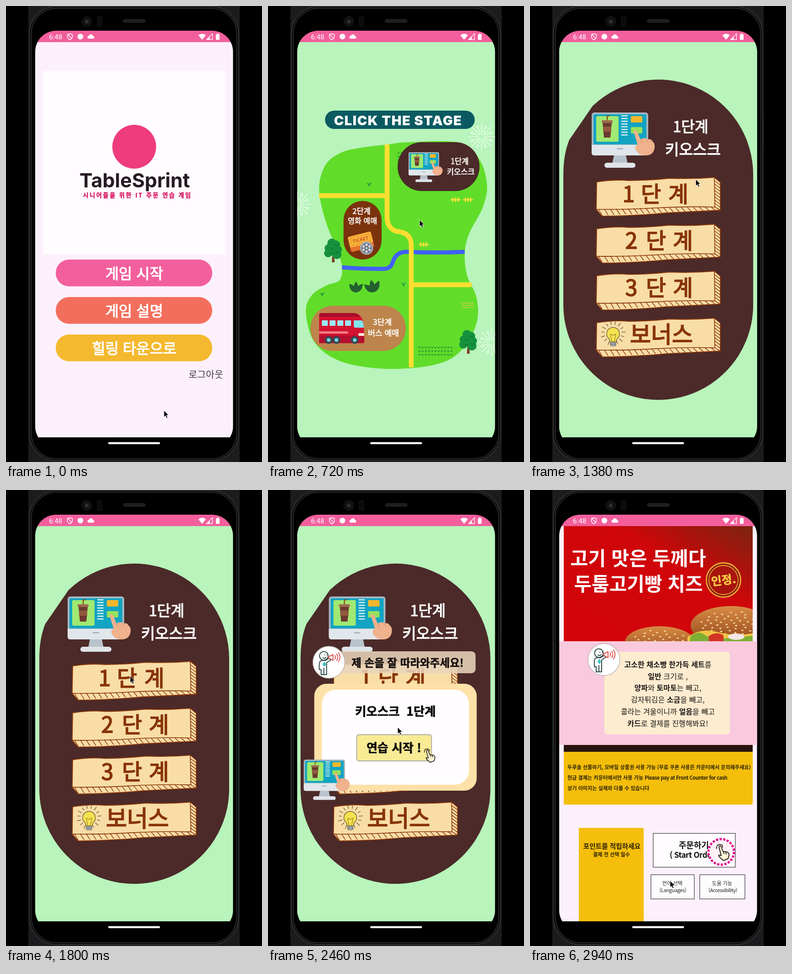
An HTML page for the animation above (3000 ms loop, 561 px wide and 998 px high).

```html
<!DOCTYPE html>
<html lang="ko">
<head>
<meta charset="utf-8">
<style>
html, body { margin: 0; width: 100%; height: 100%; overflow: hidden; background: #000; }
svg { display: block; width: 100vw; height: 100vh; }
text { font-family: "Noto Sans CJK KR", "Noto Sans CJK", "Noto Sans CJK JP", sans-serif; white-space: pre; }
</style>
</head>
<body>
<svg id="stage" viewBox="0 0 561 998" xmlns="http://www.w3.org/2000/svg"></svg>
<script>
const PINK = '#f25f9c', MINT = '#b8f4bb', PALE = '#fdf0fd', COCOA = '#4b2a29', BROWN = '#883407';

// --- drawing helpers -------------------------------------------------------
const rect = (x, y, x2, y2, fill, r = 0, more = '') =>
  `<rect x="${x}" y="${y}" width="${x2 - x}" height="${y2 - y}" rx="${r}" fill="${fill}" ${more}/>`;
const circle = (x, y, r, fill, more = '') => `<circle cx="${x}" cy="${y}" r="${r}" fill="${fill}" ${more}/>`;
const path = (d, fill, more = '') => `<path d="${d}" fill="${fill}" ${more}/>`;
const line = (d, stroke, width, more = '') =>
  path(d, 'none', `stroke="${stroke}" stroke-width="${width}" stroke-linecap="round" stroke-linejoin="round" ${more}`);
const group = (move, body, more = '') => `<g transform="${move}" ${more}>${body}</g>`;
const use = (id, move) => `<use href="#${id}" transform="${move}"/>`;
const repeat = (n, draw) => Array.from({ length: n }, (_, i) => draw(i)).join('');
// y is the optical middle of the line; a thin stroke gives the weights between regular, bold and black
const MEDIUM = 500, HEAVY = 800;
const label = (x, y, size, str, fill = '#fff', weight = MEDIUM, more = 'text-anchor="middle"') => {
  const swell = { [MEDIUM]: .038, [HEAVY]: .025 }[weight] || 0;
  const face = weight === MEDIUM ? 400 : weight === HEAVY ? 700 : weight;
  return `<text x="${x}" y="${y + size * 0.375}" font-size="${size}" fill="${fill}" stroke="${swell ? fill : 'none'}"
    stroke-width="${size * swell}" font-weight="${face}" ${more}>${str}</text>`;
};

function smoothLoop(points) {
  const n = points.length, at = i => points[(i + n) % n];
  return `M${at(0)}` + repeat(n, i => {
    const [a, b, c, d] = [at(i - 1), at(i), at(i + 1), at(i + 2)];
    const mix = (p, q, r, s) => [p[0] + (r[0] - q[0]) * s, p[1] + (r[1] - q[1]) * s];
    return `C${mix(b, a, c, 1 / 6)} ${mix(c, b, d, -1 / 6)} ${c}`;
  }) + 'Z';
}

// --- shared pictures -------------------------------------------------------
const kiosk =
  path('M184 326h26l4 20h-34z', '#b9c3cc') + rect(163, 343, 231, 354, '#dfe4e9', 6) +
  rect(135, 233, 259, 327, '#a9b6c1', 6) + path('M135 304h124v17q0 6-6 6H141q-6 0-6-6z', '#e0e6eb') +
  rect(139, 237, 255, 303, '#12a4c2', 2) + rect(145, 241, 194, 297, '#a0e972', 3) +
  line('M169 250v-9l5-1', BROWN, 2) + rect(157, 250, 181, 256, '#a06a4c', 2) +
  path('M159 256h20l-3 32h-14z', '#6b3a30') + rect(160, 264, 178, 275, '#93593e') +
  repeat(8, i => rect(200, 239 + i * 6, 214, 241.5 + i * 6, '#d9f3f7', 1)) +
  rect(221, 241, 246, 255, '#f4b62c', 2) + rect(221, 265, 246, 279, '#96e05c', 2) +
  rect(190, 311, 204, 314, '#aab4bd', 1.5) +
  path('M227 275q3-6 8 0l7 17q10-6 15 0q9-2 11 4q6 4 5 14q-2 16-18 17q-16 1-23-12q-4-8 4-11z', '#f0b18d') +
  line('M243 293l2 6M257 293l2 5', '#d98f6c', 1.2);

const guide =
  circle(0, 0, 35, '#fff', 'stroke="#bbb3ae" stroke-width="1.4"') +
  `<g fill="none" stroke="#2f4a48" stroke-width="2" stroke-linecap="round" stroke-linejoin="round">
    <circle cx="-11" cy="-14" r="9.5"/><path d="M-13-10q4 3 7-1M-9-16h.2M-4-16h.2"/>
    <path d="M-15-4q-6 1-6 8v12h4v11h6v-14v14h6V1L4-5l-3-4l-8 5z"/></g>` +
  path('M-10-2l4 7l-4 5l-4-5z', '#3fc0c4') +
  `<g fill="none" stroke="#dd5552" stroke-width="2" stroke-linecap="round">
    <path d="M-1-12l10-5v13l-10-5zM13-15q3 4 0 8M17-18q5 7 0 14M21-21q7 10 0 20"/></g>`;

const hand = path('M-4-11q3-4 5 0l4 10l8 1q6 2 5 8l-2 7l-10 4l-8-7q-5-5-1-5l4 1z', '#fff6d8',
  'stroke="#2d2522" stroke-width="2" stroke-linejoin="round"') +
  line('M-9-7q-1-9 7-9q7 0 6 6M6 0l1 4M11 1l1 4', '#2d2522', 1.8);

const plank =
  path('M146 385q40-6 70-3q40 0 90-5q50 2 98-2l13 11v61q-60 3-120 6q-60 6-139 7l-13-15z', '#f8dda7',
    `stroke="${BROWN}" stroke-width="1.8" stroke-linejoin="round"`) +
  line('M145 445q60 1 130-3t130-2l-1-65M405 440l12 7', BROWN, 1.6) +
  repeat(20, i => line(`M${150 + i * 13} ${445 - i * .25}l8 ${13 - i * .35}`, BROWN, 1.4)) +
  repeat(8, i => line(`M405 ${383 + i * 7}l12 9`, BROWN, 1.4));

const burst = repeat(16, i => group(`rotate(${i * 22.5})`, i % 2
  ? line('M0-9V-20', '#fff', 1.2) + circle(0, -23, 2.4, 'none', 'stroke="#fff"')
  : line('M0-5V-30', '#fff', 1.2)));

const tree = path('M-2 6h4l1 20h-6z', '#7a3d20') + line('M0 14l7-6', '#7a3d20', 2) +
  [[-3, -16, 10], [6, -13, 9], [-10, -5, 9], [10, -2, 9], [-11, 6, 9], [8, 9, 10], [0, 0, 11]]
    .map(([x, y, r]) => circle(x, y, r, '#15913d')).join('') +
  line('M-8-6q4 3 7 0M3-12q4 3 7 0M-9 6q5 3 8 0M5 4q4 3 8 0', '#0b6c2b', 1.3);

const leaf = line('M0 4q-1-5-4-6M0 4q0-5 4-7M0 3v-3', '#14923a', 1.8);
const fence = line('M0 0H20M4-4V4M10-4V4M16-4V4', '#fbe13c', 2.6);
const grass = repeat(33, i => line(`M${(i % 11) * 7} ${Math.floor(i / 11) * 8}l2 3l2-3`, '#188a32', 1.3));
const bush = [-38, 0, 38].map(a => group(`rotate(${a} 0 12)`, path('M0 12q-11-10 0-24q10 14 0 24', '#235f2f'))).join('');

// --- screens ---------------------------------------------------------------
const backdrop = fill => rect(-10, 79, 570, 944, fill);

const home = backdrop(PALE) + rect(81, 142, 481, 543, '#fffcff') + circle(281, 308, 48, '#ee3c7c') +
  label(282, 381, 43, 'TableSprint', '#261b22', 700, 'text-anchor="middle" style="font-family:Inter,sans-serif"') +
  label(288, 414, 13.2, '시니어들을 위한 IT 주문 연습 게임', '#d8125f', HEAVY, 'text-anchor="middle" letter-spacing="2.5"') +
  [['게임 시작', PINK], ['게임 설명', '#f36f5d'], ['힐링 타운으로', '#f4b92f']].map(([name, fill], i) =>
    rect(109, 555 + i * 82, 452, 613.5 + i * 82, fill, 29) + label(281, 585 + i * 82, 32, name)).join('') +
  label(438, 806, 20.6, '로그아웃', '#403a42', 400);

const island = smoothLoop([[262, 303], [310, 298], [420, 299], [463, 335], [480, 392], [470, 442], [440, 500],
  [431, 545], [437, 592], [457, 638], [458, 690], [433, 742], [395, 775], [330, 791], [240, 793], [155, 776],
  [102, 736], [83, 672], [95, 634], [127, 612], [157, 600], [162, 570], [150, 530], [126, 470], [112, 400],
  [126, 348], [160, 321], [205, 310]]);

const ticket = group('translate(203 513) rotate(-14)',
  rect(-26, -4, 26, 20, '#e8742c', 3) + rect(-26, -14, 26, 10, '#f9b23b', 3) +
  rect(-21, -10, 21, 6, 'none', 1, 'stroke="#d9721f" stroke-dasharray="3 2"') +
  label(0, -2, 10, 'TICKET', '#c4501c', 700)) +
  circle(216, 530, 14.5, '#a7adb8') + circle(216, 530, 11.5, '#737b88') +
  repeat(6, i => group(`translate(216 530) rotate(${i * 60})`, circle(0, -7.5, 2.6, '#d4d9e0'))) + circle(216, 530, 2, '#d4d9e0');

const bus = path('M112 677q0-5 5-5h70q20 0 23 28l1 32q0 6-5 6h-94z', '#d3122f') +
  path('M112 677q0-5 5-5h70q9 0 14 8h-89z', '#a80d2b') + rect(112, 721, 211, 738, '#b50f2d', 3) +
  repeat(4, i => rect(118 + i * 17, 688, 131 + i * 17, 700, '#9de8f4', 1)) +
  path('M188 688h18q4 6 4 16h-18q-4 0-4-4z', '#82e4ee') + rect(112, 712, 176, 717, '#f27d86', 2) +
  rect(198, 716, 211, 722, '#fbe9dc', 2) +
  [133, 150, 190].map(x => circle(x, 731, 8.5, '#344653') + circle(x, 731, 4, '#79d6de')).join('');

const map = backdrop(MINT) + path(island, '#61dd29') +
  line('M162 572Q220 576 256 575Q269 575 274 559Q280 540 300 538Q370 541 431 538', '#4160f5', 9, 'style="stroke-linecap:butt"') +
  line('M112 415H258M261 303V462Q261 486 281 493Q314 496 314 523V791M314 610H446', '#fdde30', 10.5, 'style="stroke-linecap:butt"') +
  use('burst', 'translate(468 286)') + use('burst', 'translate(65 434)') + use('burst', 'translate(490 736)') +
  group('translate(284 320)', grass) + group('translate(330 746)', grass) +
  [[222, 390], [297, 609], [119, 631]].map(p => group(`translate(${p})`, leaf)).join('') +
  [[401, 424], [428, 424], [331, 522]].map(p => group(`translate(${p})`, fence)).join('') +
  repeat(15, i => circle(426 + (i % 5) * 5.5 + (Math.floor(i / 5) % 2) * 2, 650 + Math.floor(i / 5) * 5, 1.6, '#e5c94b')) +
  group('translate(193 615)', bush) + group('translate(229 613) rotate(-14) scale(1.15)', bush) +
  use('tree', 'translate(143 535)') + use('tree', 'translate(439 735)') +
  rect(125, 229, 453, 269, '#0b5a62', 20) +
  label(285, 250, 29, 'CLICK THE STAGE', '#fff', 900, 'text-anchor="middle" letter-spacing="1.5" style="font-family:Inter,sans-serif"') +
  rect(284, 298, 463.5, 405, COCOA, 53) + use('kiosk', 'translate(235.1 194.2) scale(.54)') +
  label(420, 340, 16.6, '1단계') + label(422.5, 363, 16.6, '키오스크') +
  rect(165.5, 426.5, 249, 555, '#7b330d', 42) + label(205, 449, 16.5, '2단계') + label(207, 470, 16.2, '영화 예매') + ticket +
  rect(93, 656, 302, 755, '#bd844b', 49) + bus + label(250.5, 692, 17.2, '3단계') + label(253, 716, 17.2, '버스 예매');

const bulb = repeat(14, i => group(`translate(182 716) rotate(${i * 24 - 156})`, line(`M0-19V${i % 2 ? -25 : -27}`, '#5a4a30', 1.2))) +
  path('M175 735q0-6-4-9a14 14 0 1 1 22 0q-4 3-4 9z', '#f6e14f', 'stroke="#56502c" stroke-width="1.2"') +
  line('M179 734l-3-16l6 3l6-3l-3 16', '#8f7a25', 1.1) + rect(176, 736, 188, 744, '#a9b0b4', 2, 'stroke="#555"') + line('M176 740h12', '#555', 1);

const plankText = (y, parts, size) => parts.map(([x, s]) => label(x, y, size, s, BROWN)).join('');

const levels = backdrop(MINT) +
  path('M86 293L137 219A208 208 0 0 1 489 369V654A208 208 0 0 1 73 654V369Q73 325 86 293Z', COCOA) +
  use('kiosk', '') + label(352, 264, 32.5, '1단계') + label(357, 314, 33.2, '키오스크') +
  repeat(4, i => use('plank', `translate(0 ${i * 102.7})`)) +
  plankText(411, [[216, '1'], [265, '단'], [325, '계']], 48) +
  plankText(513, [[222, '2'], [276, '단'], [335, '계']], 48) +
  plankText(616, [[222, '3'], [276, '단'], [335, '계']], 48) +
  plankText(718, [[288, '보너스']], 50) + bulb;

const dialog = rect(140, 353, 456.5, 401, '#ead5ba', 9, 'opacity=".87"') + use('guide', 'translate(135 377)') +
  label(307.5, 378, 23.6, '제 손을 잘 따라와주세요!', '#17110f', HEAVY) +
  rect(103, 424, 459, 658, '#fde1a8', 27) + rect(119.5, 437, 442, 645, '#fffdff', 31) +
  label(281, 484, 26.5, '키오스크  1단계', '#0c0a0b', HEAVY) +
  rect(196, 535.5, 360, 593, '#f9eb94', 5, 'stroke="#a9a9a5" stroke-width="1.8"') +
  label(277.5, 564, 26, '연습 시작 !', '#0c0a0b', HEAVY) +
  use('hand', 'translate(352 580) scale(.85)') + use('kiosk', 'translate(-18.6 419.9) scale(.73)');

const bun = (x, y, rx, ry, n) => `<ellipse cx="${x}" cy="${y}" rx="${rx}" ry="${ry}" fill="url(#crust)"/>` +
  repeat(n, i => {
    const a = i * 2.4, d = Math.sqrt((i + .5) / n) * .8;
    return `<ellipse cx="${x + Math.cos(a) * rx * d}" cy="${y - 6 + Math.sin(a) * ry * d * .75}" rx="2.6" ry="1.6" fill="#f4d29a"/>`;
  });
const b = s => `<tspan font-weight="700">${s}</tspan>`;
const note = [b('고소한 채소빵 한가득 세트') + '를', b('일반') + ' 크기로 ,', b('양파') + '와 ' + b('토마토') + '는 빼고,',
  '감자튀김은 ' + b('소금') + '을 빼고,', '콜라는 겨울이니까 ' + b('얼음') + '을 빼고', b('카드') + '로 결제를 진행해봐요!'];
const notice = ['두루솔 선물하기, 모바일 상품권 사용 가능 (무료 쿠폰 사용은 카운터에서 문의해주세요)',
  '현금 결제는 카운터에서만 사용 가능 <tspan letter-spacing="-.55">Please pay at Front Counter for cash</tspan>',
  '상기 이미지는 실제와 다룰 수 있습니다'];
const outline = 'stroke="#39343a" stroke-width="1.2"';

const order = backdrop(PALE) + rect(74, 79, 488, 331, 'url(#poster)') +
  `<g clip-path="url(#posterClip)">${bun(284, 333, 76, 35, 30)}${bun(440, 297, 88, 43, 46)}` +
  path('M345 322q30-22 70-10q40 10 80 0v25H345z', '#f3c443') +
  path('M352 319q20-14 36 2q20-8 34 4l66-6v12H350z', '#7fae35') +
  path('M392 320q15-12 32-2v13h-32z', '#d23424') + `<ellipse cx="452" cy="321" rx="18" ry="7" fill="#f4e7e6"/></g>` +
  label(237, 149, 42.5, '고기 맛은 두께다', '#fff', 700) + label(237.5, 205, 42, '두툼고기빵 치즈', '#fff', 700) +
  circle(424, 197, 37.5, '#8e1210', 'stroke="#e5a934" stroke-width="3"') + circle(424, 197, 32, '#a9140e', 'stroke="#e5a934" stroke-width="1.8"') +
  group('rotate(-7 424 197)', label(424, 197, 25, '인정.', '#f9cb43', HEAVY)) +
  rect(74, 555, 488, 574, '#28130f') + rect(-10, 331, 570, 558, '#f9c9dd') +
  rect(163, 354, 438, 535, '#fdecd0', 7) + use('guide', 'translate(162 371)') +
  note.map((s, i) => label(302, 382 + i * 25.7, 16.1, s, '#1c1716', 400)).join('') +
  rect(74, 573, 488, 688.5, '#f4be0b') +
  notice.map((s, i) => label(82, 607 + i * 23, 11.15, s, '#2c2206', 700, '')).join('') +
  rect(107, 739.5, 249, 944, '#f4be0b') +
  label(179.5, 779, 14.7, '포인트를 적립하세요', '#2c2206', 700) + label(178.5, 798, 11.1, '결제 전 선택 필수', '#2c2206') +
  rect(270, 751.5, 450, 825.5, '#fffcff', 0, outline) +
  label(359, 777, 18, '주문하기', '#111', 700) +
  label(306, 799, 17, '( Start Order )', '#111', 700, 'letter-spacing="-.6"') +
  circle(419, 792, 28, '#fff3f9', 'stroke="#e2178f" stroke-width="5" stroke-dasharray="5 3"') + use('hand', 'translate(418 792)') +
  rect(265, 842, 360, 895, '#fffcff', 0, outline) + rect(372, 842, 471, 895, '#fffcff', 0, outline) +
  label(312, 861, 11.2, '언어 선택', '#222', 400) + label(313, 876, 11, '(Languages)', '#222', 400, 'text-anchor="middle" letter-spacing="-.4"') +
  label(421, 861, 11.2, '도움 기능', '#222', 400) + label(422.5, 876, 11, '(Accessibility)', '#222', 400, 'text-anchor="middle" letter-spacing="-.5"');

// --- phone -----------------------------------------------------------------
const phone = rect(49, 0, 512, 998, '#1c1c1e') + rect(508, 236, 512, 313, '#29292b', 1) +
  rect(51, 1, 510, 995, '#0a0a0b', 60, 'stroke="#333336" stroke-width="2"') +
  rect(55.5, 5, 505.5, 991, '#000', 56, 'stroke="#29292b" stroke-width="2"') +
  circle(177, 34, 11, '#101011', 'stroke="#1c1c1e"') + circle(177, 34, 5, '#242428') + circle(177, 34, 2, '#3c3c42') +
  rect(200, 23, 210, 45, '#0b0b0c', 2, 'stroke="#18181a"') + rect(257, 29.5, 305, 36, '#1d1d1e', 3, 'stroke="#2b2b2c"');

const statusIcons = label(94, 67.5, 15.2, '6:48', '#fff', 400, 'style="font-family:Roboto,sans-serif"') +
  line('M140 60.5l5.5 2v4q0 5-5.5 7.5q-5.5-2.5-5.5-7.5v-4zM136.5 63l7 8', '#fff', 1.5) +
  circle(163, 67, 6.2, '#fff') +
  path('M182 71.5q-3.5 0-3.5-3q0-3 3-3q1-3.5 4.5-3.5q4 0 4.5 4q3 0 3 2.7t-3 2.8z', '#fff') +
  path('M421.5 64q8.500-6.500 16.500 0l-8.300 10z', '#fff') +
  path('M452.5 60.5v13h-13z', 'none', 'stroke="#fff" stroke-width="1.3"') + path('M446.5 66.5v7h-7z', '#fff') +
  path('M460 62h2v-1.5h4V62h2v12h-8z', '#fff');

const svg = document.getElementById('stage');
svg.innerHTML = `<defs>
  <clipPath id="screen">${rect(64, 54, 497.5, 966, '#fff', 46)}</clipPath>
  <clipPath id="posterClip">${rect(74, 79, 488, 331, '#fff')}</clipPath>
  <linearGradient id="crust" x2="0" y2="1"><stop stop-color="#d98b45"/><stop offset="1" stop-color="#8e4317"/></linearGradient>
  <linearGradient id="poster" x1=".1" y1=".9" x2="1" y2="0"><stop stop-color="#d3050a"/><stop offset=".6" stop-color="#cf060a"/><stop offset="1" stop-color="#7a2410"/></linearGradient>
  ${Object.entries({ kiosk, guide, hand, plank, burst, tree }).map(([id, body]) => `<g id="${id}">${body}</g>`).join('')}
</defs>${phone}
<g clip-path="url(#screen)">
  <g id="home">${home}</g><g id="map">${map}</g><g id="levels">${levels}</g>
  ${rect(64, 54, 498, 79, PINK)}
  <g id="dim">${rect(64, 54, 498, 944, '#000')}</g><g id="dialog">${dialog}</g><g id="order">${order}</g>
  ${rect(64, 944, 498, 966, '#000')}
</g>${statusIcons}${rect(224, 954.5, 337.5, 959, '#fff', 2.2)}
<g id="cursor">${path('M0 0V15l3.4-3.2l2.4 5.4l2.6-1.2l-2.4-5.2h4.6z', '#000', 'stroke="#fff" stroke-width="1"')}</g>`;

// --- motion ----------------------------------------------------------------
const LOOP = 3000, STEP = 60, SLIDE = 300, SHIFT = 43;
const opens = { map: 420, levels: 1120, order: 2440 };
const pointer = [[0, 346, 885], [60, 346, 885], [360, 290, 590], [440, 290, 588], [720, 332, 468], [1020, 380, 374],
  [1260, 380, 374], [1740, 272, 407], [1900, 272, 407], [2130, 260, 572], [2370, 260, 572], [2460, 284, 519], [2900, 307, 855], [3000, 307, 855]];

const clamp = v => Math.min(1, Math.max(0, v));
const ramp = (t, from, to) => clamp((t - from) / (to - from));
const bezier = (a, b, c, d, s) => a * (1 - s) ** 3 + 3 * b * s * (1 - s) ** 2 + 3 * c * s * s * (1 - s) + d * s ** 3;

// quick start with a very long settle
function ease(p) {
  const [xs, ys] = p < 1 / 6 ? [[0, .05, .1333, 1 / 6], [0, 0, .06, .4]] : [[1 / 6, .2083, .25, 1], [.4, .82, 1, 1]];
  let lo = 0, hi = 1;
  for (let i = 0; i < 24; i++) {
    const mid = (lo + hi) / 2;
    if (bezier(...xs, mid) < p) lo = mid; else hi = mid;
  }
  return bezier(...ys, lo);
}

function pointerAt(t) {
  const i = Math.max(1, pointer.findIndex(k => k[0] >= t));
  const [t0, x0, y0] = pointer[i - 1], [t1, x1, y1] = pointer[i];
  const p = ramp(t, t0, t1), s = p * p * (3 - 2 * p);
  return [x0 + (x1 - x0) * s, y0 + (y1 - y0) * s];
}

const nodes = Object.fromEntries(['home', 'map', 'levels', 'dim', 'dialog', 'order', 'cursor']
  .map(id => [id, document.getElementById(id)]));

function place(id, dx, opacity) {
  nodes[id].setAttribute('transform', `translate(${dx.toFixed(2)} 0)`);
  nodes[id].setAttribute('opacity', opacity);
  nodes[id].style.display = opacity > 0 ? '' : 'none';
}

function render(t) {
  const slide = id => ease(ramp(t, opens[id], opens[id] + SLIDE));
  const fade = id => ramp(t, opens[id] + SLIDE * .11, opens[id] + SLIDE * .3);
  const enter = id => SHIFT * (1 - slide(id));
  const leave = id => -SHIFT * slide(id);
  const until = id => t < opens[id] + SLIDE ? 1 : 0;
  place('home', leave('map'), until('map'));
  place('map', enter('map') + leave('levels'), fade('map') * until('levels'));
  place('levels', enter('levels') + leave('order'), fade('levels') * until('order'));
  place('dim', 0, .63 * ramp(t, 1920, 2060) * (1 - ramp(t, 2340, 2440)));
  place('dialog', leave('order'), ramp(t, 1930, 2030) * until('order'));
  place('order', enter('order'), fade('order'));
  nodes.cursor.setAttribute('transform', `translate(${pointerAt(t)})`);
}

function tick() {
  const t = performance.now() % LOOP;
  render(Math.floor(t / STEP) * STEP);
  requestAnimationFrame(tick);
}
tick();
</script>
</body>
</html>
```
